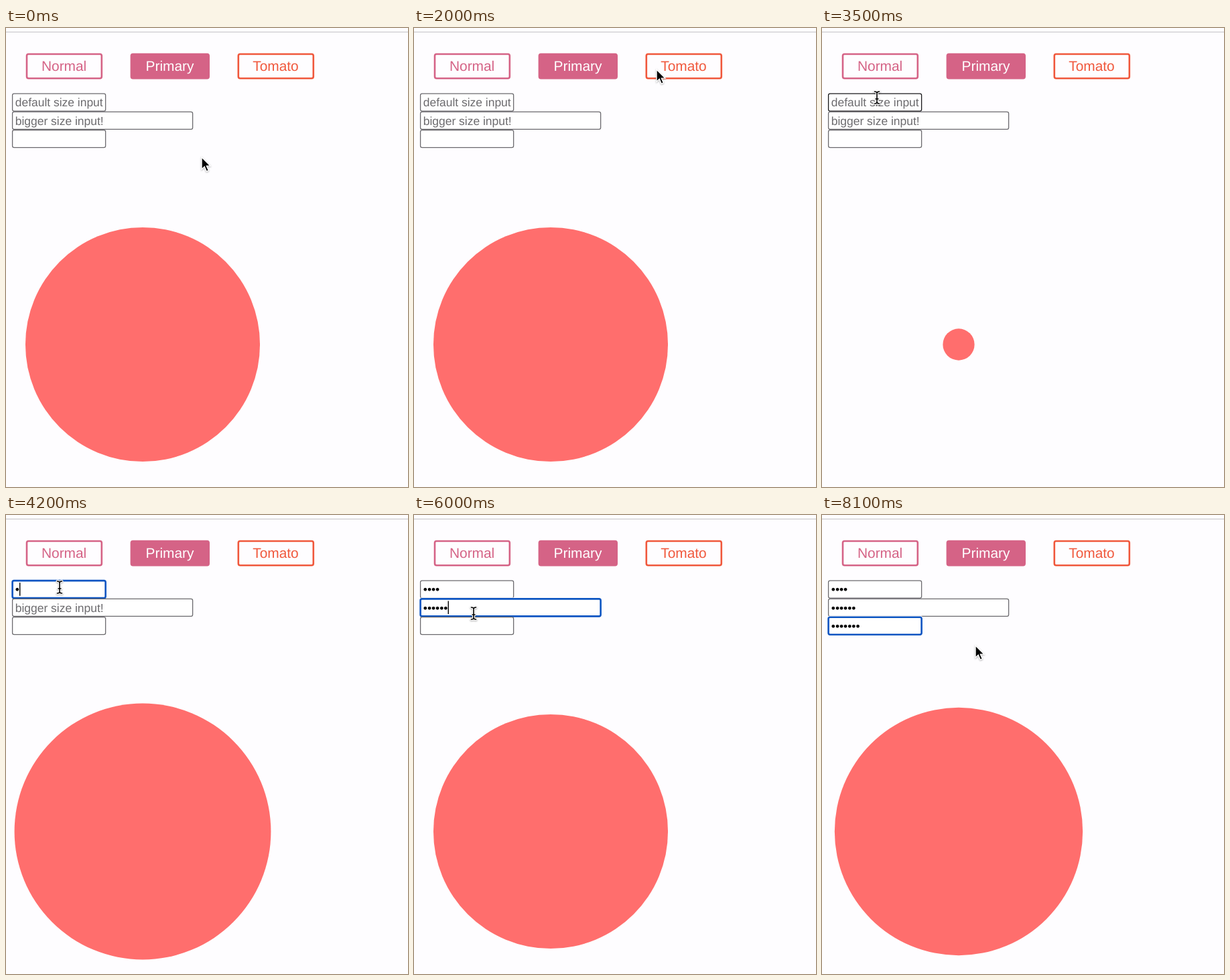
Write an HTML page that moves like this. It is 600 px wide and 686 px high and loops after 8.2 s.

```html
<!DOCTYPE html>
<html lang="en">
<head>
<meta charset="utf-8">
<title>Buttons, inputs and a pulsing circle</title>
<style>
  html, body { margin: 0; width: 100%; height: 100%; overflow: hidden; background: #fefdff; }
  svg { display: block; width: 600px; height: 686px; }
  text { font-family: "Liberation Sans", Arial, sans-serif; text-rendering: geometricPrecision; }
  .button rect { stroke-width: 2.6; }
  .button text { font-size: 20.9px; text-anchor: middle; }
  .input rect { fill: #fff; stroke: #6b6a6e; stroke-width: 1.3; }
  .input text { font-size: 17.45px; fill: #6c6b6e; }
  .input.hover rect { stroke: #18181a; }
  .input .halo { display: none; }
  .input.focus .halo { display: inline; stroke: #fefdff; stroke-width: 4.4; }
  .input.focus .box { stroke: #0c55c2; stroke-width: 2.6; }
  .input.filled text { fill: #000; }
  .caret { fill: #000; }
  #arrow, #beam { filter: drop-shadow(0 1.5px 1.2px rgba(0, 0, 0, .3)); }
</style>
</head>
<body>
<svg viewBox="0 0 600 686">
  <rect y="5.4" width="600" height="1.3" fill="#cdccd0"/>
  <g id="buttons"></g>
  <g id="inputs"></g>
  <circle id="pulse" cx="204" cy="473" fill="#ff6e6d"/>
  <g id="arrow">
    <path d="M0 0V18.2L4.2 14.3L7.2 21.3L10.4 19.9L7.4 13.1H13Z" fill="#000" stroke="#fff" stroke-width="1.4"/>
  </g>
  <g id="beam" fill="none" stroke-linecap="round">
    <path id="ibar" d="M-3.6-9Q0-9 0-6.5Q0-9 3.6-9M0-6.5V6.5M-3.6 9Q0 9 0 6.5Q0 9 3.6 9M-2 2H2" stroke="#fff" stroke-width="3.6"/>
    <use href="#ibar" stroke="#000"/>
    <path d="M-3.6-9Q0-9 0-6.5Q0-9 3.6-9M0-6.5V6.5M-3.6 9Q0 9 0 6.5Q0 9 3.6 9M-2 2H2" stroke="#000" stroke-width="1.6"/>
  </g>
</svg>
<script>
const LOOP = 8200, STEP = 100;
const PINK = '#d56386', TOMATO = '#f0583c', PAGE = '#fefdff';
const $ = id => document.getElementById(id);

function add(parent, tag, attrs = {}, text = '') {
  const el = document.createElementNS('http://www.w3.org/2000/svg', tag);
  for (const name in attrs) el.setAttribute(name, attrs[name]);
  el.textContent = text;
  return parent.appendChild(el);
}

function addButton(label, x, width, line, fill, ink) {
  const g = add($('buttons'), 'g', { class: 'button' });
  const box = add(g, 'rect', { x: x + 1.3, y: 39, width: width - 2.6, height: 36.2, rx: 2.6, stroke: line, fill });
  add(g, 'text', { x: x + width / 2 - .3, y: 64, fill: ink }, label);
  return box;
}

const normal = addButton('Normal', 29.7, 114.4, PINK, PAGE, PINK);
addButton('Primary', 185.6, 118.4, PINK, PINK, '#fff');
addButton('Tomato', 345.5, 114.6, TOMATO, PAGE, TOMATO);

// focus and blur times, and the moment each character is typed
const fields = [
  { hint: 'default size input', y: 97.4, width: 140.2, focus: 3800, blur: 5100, keys: [4200, 4400, 4500, 4700] },
  { hint: 'bigger size input!', y: 124.7, width: 270.2, focus: 5100, blur: 6200, keys: [5400, 5500, 5600, 5700, 5800, 5900] },
  { hint: '', y: 152, width: 140.2, focus: 6200, blur: LOOP, keys: [6500, 6600, 6800, 6900, 7100, 7200, 7400] }
];
for (const f of fields) {
  f.g = add($('inputs'), 'g');
  const rect = { x: 9.6, y: f.y + .7, width: f.width - 1.2, height: 26, rx: 2.4 };
  add(f.g, 'rect', { ...rect, class: 'halo' });
  add(f.g, 'rect', { ...rect, class: 'box' });
  f.text = add(f.g, 'text', { x: 13.8, y: f.y + 19.8 });
  f.caret = add(f.g, 'rect', { class: 'caret', y: f.y + 3.8, width: 1.4, height: 19.6, style: 'fill:#000;stroke:none' });
}

// pointer path: time, x, y
const path = [
  [0, 292, 193], [200, 290, 190], [500, 170, 110], [700, 102, 60], [800, 99, 57], [1000, 100, 57],
  [1300, 180, 62], [1600, 262, 62], [2000, 362, 62], [2400, 405, 60], [2700, 395, 64],
  [3100, 230, 90], [3500, 82, 104], [4000, 80, 108], [4600, 80, 108], [4900, 85.5, 132],
  [5200, 86, 138], [5900, 86, 138], [6200, 95, 165], [6500, 100, 168], [6800, 109, 180],
  [7300, 120, 186], [8100, 229, 195], [LOOP, 229, 195]
];

function pointer(t) {
  const i = path.findIndex(p => p[0] > t);
  const [t0, x0, y0] = path[i - 1], [t1, x1, y1] = path[i];
  const k = (t - t0) / (t1 - t0);
  return [x0 + (x1 - x0) * k, y0 + (y1 - y0) * k];
}

// cubic-bezier(.25, .1, .25, 1)
function ease(p) {
  const curve = (a, b, s) => 3 * a * s * (1 - s) ** 2 + 3 * b * s * s * (1 - s) + s ** 3;
  let lo = 0, hi = 1;
  for (let i = 0; i < 24; i++) {
    const mid = (lo + hi) / 2;
    if (curve(.25, .25, mid) < p) lo = mid; else hi = mid;
  }
  return curve(.1, 1, lo);
}

function radius(t) {
  const phase = (t + 616) % 2000;
  return 195.4 * (phase < 1000 ? ease(phase / 1000) : 1 - ease(phase / 1000 - 1));
}

function drawField(f, t, over) {
  const typed = f.keys.filter(k => k <= t);
  const focused = t >= f.focus && t < f.blur;
  const since = t - (typed.at(-1) ?? f.focus);
  f.g.setAttribute('class', 'input' + (over ? ' hover' : '') + (focused ? ' focus' : '') + (typed.length ? ' filled' : ''));
  f.text.textContent = typed.length ? '•'.repeat(typed.length) : f.hint;
  f.caret.setAttribute('x', 13.9 + typed.length * 6.11);
  f.caret.setAttribute('visibility', focused && since % 1000 < 500 ? 'visible' : 'hidden');
}

function draw(now) {
  const t = Math.floor(now % LOOP / STEP) * STEP;
  const [x, y] = pointer(t);
  const inside = f => x > 9 && x < 9 + f.width && y > f.y && y < f.y + 27.3;

  $('pulse').setAttribute('r', radius(t));
  normal.setAttribute('fill', x > 30 && x < 144 && y > 38 && y < 76 ? '#ff0000' : PAGE);
  for (const f of fields) drawField(f, t, inside(f));

  const typing = fields.some(inside);
  $('arrow').setAttribute('visibility', typing ? 'hidden' : 'visible');
  $('beam').setAttribute('visibility', typing ? 'visible' : 'hidden');
  $(typing ? 'beam' : 'arrow').setAttribute('transform', `translate(${x} ${y})`);
}

const start = performance.now();
function tick() {
  draw(performance.now() - start);
  requestAnimationFrame(tick);
}
tick();
</script>
</body>
</html>
```
